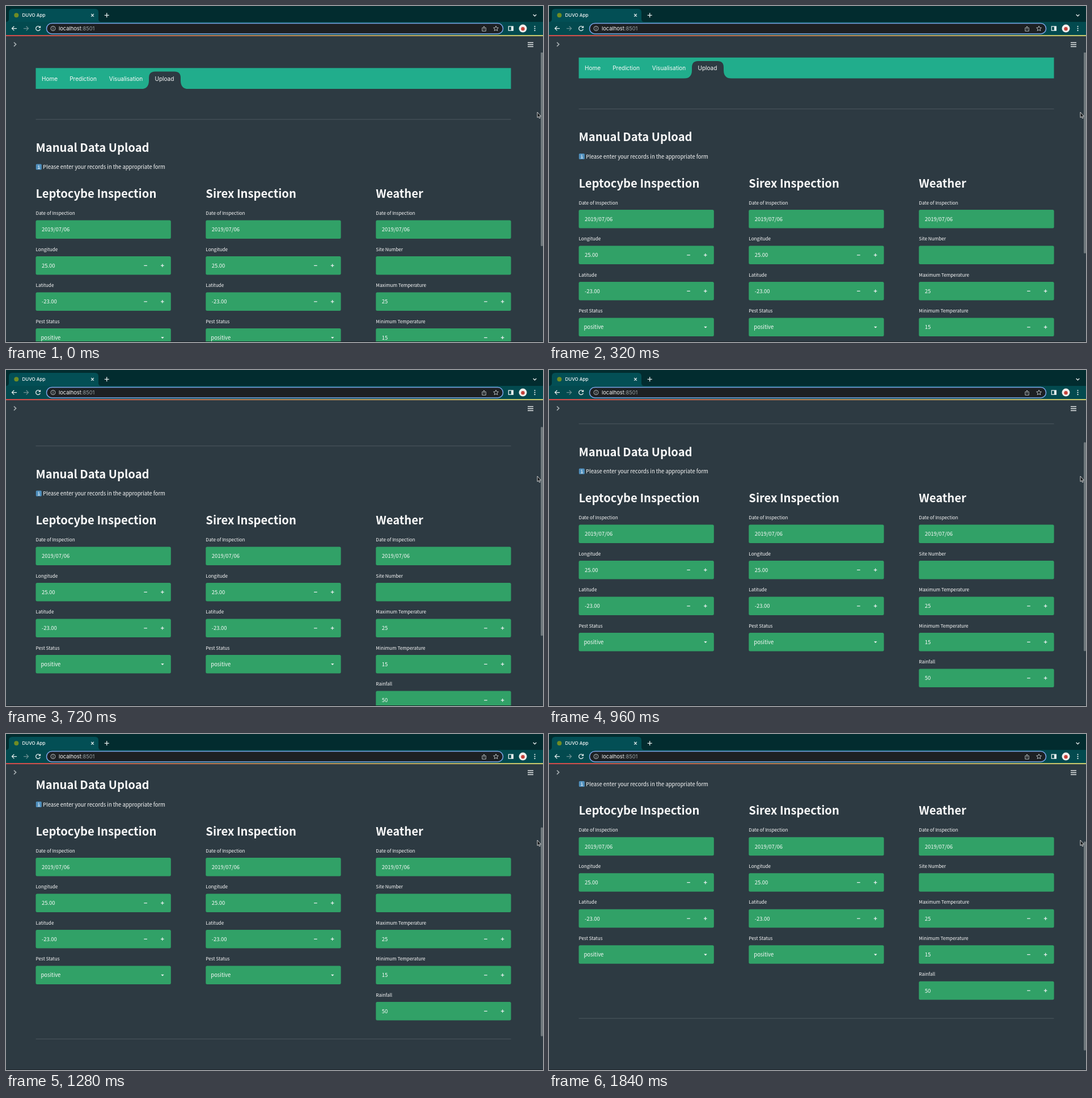
Recreate the animation shown at these times as an HTML page. Size 947 by 592 pixels, loop 1920 ms.

```html
<!DOCTYPE html>
<html lang="en">
<head>
<meta charset="utf-8">
<title>Data upload form</title>
<style>
  html, body { margin: 0; width: 100%; height: 100%; overflow: hidden; background: #2d3a42; }
  svg { display: block; width: 947px; height: 592px; }
  text { fill: #fafafa; white-space: pre; }
  .page { font: 9.45px "Noto Sans CJK JP", "Noto Sans CJK SC", "Noto Sans CJK", "Noto Sans", sans-serif; }
  .page .label { font-size: 8.2px; }
  .page .title { font-size: 20.2px; font-weight: 600; }
  .page .nav { font: 10px Inter, Roboto, sans-serif; }
  .chrome { font: 9.3px Inter, Roboto, sans-serif; }
  .line { fill: none; stroke: #e6eeee; stroke-width: 1.3; }
</style>
</head>
<body>
<svg viewBox="0 0 947 592">
  <defs>
    <clipPath id="view"><rect y="82" width="947" height="510"/></clipPath>
    <linearGradient id="stripe">
      <stop stop-color="#f04c4a"/><stop offset=".45" stop-color="#d98a55"/><stop offset="1" stop-color="#e6e072"/>
    </linearGradient>
  </defs>
  <rect width="947" height="592" fill="#2d3a42"/>

  <g clip-path="url(#view)">
    <g id="page" class="page"></g>
    <rect id="thumb" x="943" width="4" height="368" rx="1.5" fill="#70797d"/>
  </g>
  <rect y="591" width="947" height="1" fill="#1c252a"/>

  <g class="line" style="stroke:#a3abae">
    <path d="M14 64l3.6 3.6L14 71.2" stroke-width="1.7"/>
    <path d="M920 64.5h10M920 68h10M920 71.5h10" style="stroke:#e4e7e8"/>
  </g>

  <g class="chrome">
    <rect width="947" height="28" fill="#022c2f"/>
    <rect y="28" width="947" height="24" fill="#034a4f"/>
    <path d="M0 28q5 0 5-5v-12q0-6 6-6h146q6 0 6 6v12q0 5 5 5z" fill="#034f55"/>
    <rect y="51.3" width="947" height="1.8" fill="url(#stripe)"/>
    <circle cx="18.3" cy="16.2" r="4" fill="#6f8c24"/>
    <text x="28.5" y="19" font-size="8" font-weight="500">DUVO App</text>
    <rect x="71.5" y="30.5" width="805" height="18.5" rx="9.25" fill="#1d2023" stroke="#7ba6e8" stroke-width="1.5"/>
    <text x="93" y="43">localhost<tspan fill="#9aa3a6">:8501</tspan></text>
    <g class="line">
      <path d="M150.2 14l4.6 4.6m0-4.6l-4.6 4.6M173.7 16.3h8m-4-4v8M929.7 15l2.8 2.8 2.8-2.8"/>
      <path d="M19 39.6h-8.4m3.7-3.8l-3.8 3.8 3.8 3.8"/>
      <path d="M31 39.6h8.4m-3.7-3.8l3.8 3.8-3.8 3.8" stroke="#6d9092"/>
      <path d="M59.7 37.3a3.9 3.9 0 1 0 .6 3.4M60.5 35.2v3h-3"/>
      <g stroke="#b7bfc1" stroke-width="1">
        <circle cx="83" cy="39.6" r="4"/>
        <path d="M83 39v2.8M83 37v1.1M841.3 38.4h-1.5v5.8h6.4v-5.8h-1.5M843 41.5v-5.6m-1.8 1.8l1.8-1.8 1.8 1.8"/>
        <path d="M864 35.3l1.3 2.8 3.1.3-2.3 2.1.7 3.1-2.8-1.6-2.8 1.6.7-3.1-2.3-2.1 3.1-.3z"/>
      </g>
      <rect x="886.3" y="36" width="8" height="7.2"/>
    </g>
    <rect x="890.8" y="36" width="3.8" height="7.2" fill="#e6eeee"/>
    <circle cx="911.5" cy="39.6" r="7" fill="#f1eeec"/>
    <circle cx="911.5" cy="40.2" r="3.2" fill="#c3403a"/>
    <g fill="#e6eeee">
      <circle cx="932.5" cy="36" r="1.1"/><circle cx="932.5" cy="39.6" r="1.1"/><circle cx="932.5" cy="43.2" r="1.1"/>
    </g>
  </g>

  <path d="M937 187v9.6l2.1-1.8 1.4 3.2 1.6-.7-1.4-3.1h2.6z" fill="#16191b" stroke="#f4f4f4" stroke-width=".8"/>
</svg>
<script>
const page = document.getElementById('page');
const thumb = document.getElementById('thumb');
const STEP = 80, LOOP = 1920, PITCH = 63.5;

const text = (x, y, str, cls = '') => `<text x="${x}" y="${y}" class="${cls}">${str}</text>`;
const rule = y => `<rect x="52.5" y="${y}" width="838" height="1" fill="#4d585f"/>`;

function field(x, row, [label, value, kind]) {
  const y = 377.5 + row * PITCH, mid = y + 16.3;
  let out = text(x, y - 9.4, label, 'label') +
    `<rect x="${x}" y="${y}" width="238.3" height="32.5" rx="2.5" fill="#31a167"/>` +
    text(x + (kind === 'select' ? 9 : 10.4), mid + 3.5, value);
  if (kind === 'number')
    out += `<path class="line" d="M${x + 190.8} ${mid}h5.6M${x + 220.5} ${mid}h5.6m-2.8-2.8v5.6"/>`;
  if (kind === 'select')
    out += `<path d="M${x + 220.8} ${mid - 1}h5.4l-2.7 2.8z" fill="#fafafa"/>`;
  return out;
}

const column = (x, title, fields) =>
  text(x, 338, title, 'title') + fields.map((f, row) => field(x, row, f)).join('');

const date = ['Date of Inspection', '2019/07/06'];
const inspection = [
  date,
  ['Longitude', '25.00', 'number'],
  ['Latitude', '-23.00', 'number'],
  ['Pest Status', 'positive', 'select'],
];
const weather = [
  date,
  ['Site Number', ''],
  ['Maximum Temperature', '25', 'number'],
  ['Minimum Temperature', '15', 'number'],
  ['Rainfall', '50', 'number'],
];

page.innerHTML =
  '<rect x="52.5" y="109.3" width="838" height="36.7" fill="#21ad8c"/>' +
  '<path d="M237 146.5q15 0 15-15v-5q0-11 11-11h34q11 0 11 11v5q0 15 15 15z" fill="#2d3a42"/>' +
  [[63, 'Home'], [112.2, 'Prediction'], [181.8, 'Visualisation'], [262.5, 'Upload']]
    .map(([x, name]) => text(x, 131.6, name, 'nav')).join('') +
  rule(199.3) +
  text(52.5, 256.7, 'Manual Data Upload', 'title') +
  '<rect x="52.8" y="278.6" width="10" height="10" rx="1.5" fill="#4f8fbd"/>' +
  '<path d="M56.6 282.6h1.5v3.9m-1.8 0h3.4M57.8 280.2v1.3" fill="none" stroke="#eef5fa"/>' +
  text(65, 287.4, 'Please enter your records in the appropriate form') +
  column(52.5, 'Leptocybe Inspection', inspection) +
  column(352.3, 'Sirex Inspection', inspection) +
  column(652.3, 'Weather', weather) +
  rule(696.3);

// [time, scroll offset]
const scrollKeys = [
  [0, 0], [80, 2], [160, 6], [240, 12], [320, 18.5], [480, 37], [720, 66],
  [960, 105], [1120, 139.5], [1280, 159.5], [1440, 179], [1680, 195.7], [LOOP, 195.7],
];

function scrollAt(t) {
  const i = scrollKeys.findIndex(key => key[0] > t);
  const [t0, s0] = scrollKeys[i - 1], [t1, s1] = scrollKeys[i];
  return s0 + (s1 - s0) * (t - t0) / (t1 - t0);
}

function draw() {
  const t = Math.floor(performance.now() % LOOP / STEP) * STEP;
  const s = scrollAt(t);
  page.setAttribute('transform', `translate(0 ${-s})`);
  thumb.setAttribute('y', 55 + s * .687);
  requestAnimationFrame(draw);
}
draw();
</script>
</body>
</html>
```
